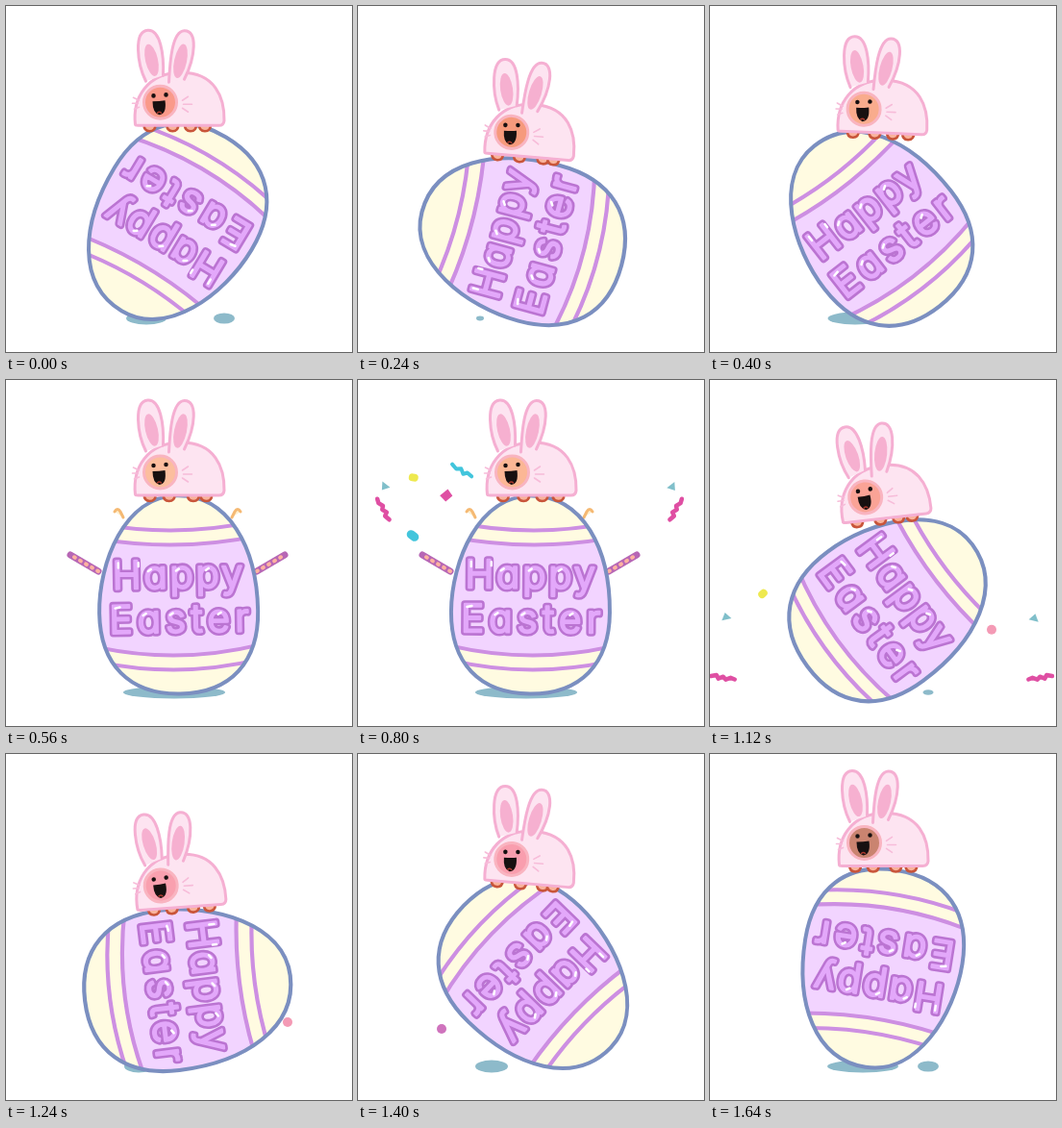
An HTML page for the animation above (1680 ms loop, 360 by 360 pixels).

```html
<!DOCTYPE html>
<html lang="en">
<head>
<meta charset="utf-8">
<title>Happy Easter</title>
<style>
html, body { margin: 0; width: 100%; height: 100%; overflow: hidden; background: #fff; }
svg { display: block; width: 100%; height: 100%; fill: none; stroke-linecap: round; stroke-linejoin: round; }
text { font: 300 40px Inter, sans-serif; font-feature-settings: "cv11"; text-anchor: middle; }
.rim { fill: #bb74d2; stroke: #bb74d2; stroke-width: 7.5; }
.core { fill: #e3a8fa; stroke: #e3a8fa; stroke-width: 2.4; }
.pink { fill: #fde4f1; stroke: #f5afd2; stroke-width: 3; }
</style>
</head>
<body>
<svg viewBox="0 0 360 360">
  <defs>
    <path id="shell" d="M0-103C54-103 82.500-48 82.500 18C82.500 71 53 103 0 103S-82.500 71-82.500 18S-54-103 0-103Z"/>
    <clipPath id="inside"><use href="#shell"/></clipPath>
    <g id="words"><text x="1" y="-7" letter-spacing="3">Happy</text><text x="3" y="39" letter-spacing="5.5">Easter</text></g>
    <g id="popper">
      <path d="M96 199L67 182" stroke="#b767b5" stroke-width="7"/>
      <path d="M96 199L67 182" stroke="#ffb3a0" stroke-width="4" stroke-dasharray="1 6"/>
    </g>
    <path id="paw" d="M113 137q3-5 6 0l3 6" stroke="#f5b973" stroke-width="3" fill="#fff0cf"/>
  </defs>
  <g fill="#8dbaca"><ellipse id="shadow" cy="325"/><ellipse id="spot" cx="227" cy="325"/></g>
  <g id="arms">
    <g id="leftArm"><use href="#popper"/><use href="#paw"/></g>
    <g transform="translate(357) scale(-1 1)"><use href="#leftArm"/></g>
  </g>
  <g id="confetti"></g>
  <g id="egg">
    <use href="#shell" fill="#fffbe1"/>
    <g clip-path="url(#inside)" stroke="#cd8fe2" stroke-width="4">
      <path d="M-90-61Q0-43 90-61V52Q0 74-90 52Z" fill="#f2d4ff"/>
      <path d="M-90-77Q0-57 90-77M-90 67Q0 89 90 67"/>
    </g>
    <use href="#words" class="rim"/>
    <use href="#words" class="core"/>
    <path d="M-62-34v5M-41-34v4M-31-25l3-2M-2-25l3-2M29-25l3-2M-66 13l5-1M-37 21l3-2M-9 21l3-2M41 21l3-2" stroke="#fff" stroke-width="2.400"/>
    <use href="#shell" stroke="#7b8fc0" stroke-width="4"/>
  </g>
  <g id="bunny">
    <g id="feet" fill="#f9b39b" stroke="#c9553a" stroke-width="2.600"></g>
    <path class="pink" d="M-46-2C-49-29-34-56 2-56C37-56 47-30 46.500-6Q46-1 41-1H-43Q-46-1-46-2Z"/>
    <path class="pink" d="M-35-47C-44-65-48-99-33-100C-20-101-16-75-17-53"/>
    <path class="pink" d="M-11-46C-10-66-8-99 5-99.500C19-100 17-73 5-49"/>
    <g fill="#f6b0d0">
      <ellipse cx="-29" cy="-69" rx="6.500" ry="17" transform="rotate(-13 -29 -69)"/>
      <ellipse cx="1" cy="-68" rx="6.500" ry="18" transform="rotate(12 1 -68)"/>
    </g>
    <path d="M3-27l6-4M4-23l9 0M3-19l6 4M-48-30l6 3M-49-24h6M-47-18l5-2" stroke="#f7bcd9" stroke-width="1.600"/>
    <g transform="translate(2 -1)">
      <circle id="face" cx="-22" cy="-24" r="17" stroke="#f9b4c0" stroke-width="3"/>
      <path d="M-29-31v.1M-16-32v.1" stroke="#171010" stroke-width="4.500"/>
      <path d="M-30-25Q-23-25-17-26Q-15-12-23-11Q-30-13-30-25Z" fill="#171010"/>
      <path d="M-25-13q2-2 4 0" stroke="#a8382d" stroke-width="1.500"/>
    </g>
  </g>
</svg>
<script>
const LOOP = 1680, STEP = 40, BURST = 600;
const $ = id => document.getElementById(id);
const set = (el, attrs) => { for (const k in attrs) el.setAttribute(k, attrs[k]); };
const add = (parent, tag, attrs) => {
  const el = document.createElementNS("http://www.w3.org/2000/svg", tag);
  set(el, attrs);
  return parent.appendChild(el);
};
const clamp = v => Math.max(0, Math.min(1, v));

// time, egg angle, bunny tilt, shadow x, shadow radius, spot radius, face r, g, b
const keys = [
  [0, 211, 0, 146, 21, 11, 250, 154, 138],
  [240, 285, 5, 127, 4, 0, 246, 154, 124],
  [560, 359, 0, 175, 53, 0, 252, 190, 158],
  [900, 361, 0, 175, 53, 0, 252, 180, 145],
  [1000, 384, -9, 176, 41, 11, 251, 165, 124],
  [1240, 443, -4, 138, 15, 0, 249, 160, 175],
  [1400, 494, 5, 139, 17, 0, 249, 158, 174],
  [1640, 549, 0, 159, 37, 11, 202, 132, 112],
  [1680, 571, 0, 146, 21, 11, 250, 154, 138]
];
function pose(t) {
  const i = keys.findIndex(k => k[0] > t), a = keys[i - 1], b = keys[i];
  const u = (t - a[0]) / (b[0] - a[0]);
  return a.map((v, j) => v + (b[j] - v) * u);
}

const feet = [-31, -9, 13, 27].map(x => ({ x, el: add($("feet"), "path", { d: "M-6-2Q-6 5 0 5T6-2" }) }));

const ribbon = "M-9 8l3-5 4 1 2-5 4 0 2-5 4-2";
const makePiece = (x, y, attrs, flip = 1) => ({
  x, y, flip, el: add($("confetti"), "path", attrs)
});
const pink = { d: ribbon, stroke: "#df4fa3", "stroke-width": 4.5 };
const chip = { d: "M-4-3L5-4L0 5Z", fill: "#80bfca" };
const pieces = [
  makePiece(13, 208, pink), makePiece(344, 208, pink, -1),
  makePiece(16, 160, chip), makePiece(338, 161, chip, -1),
  makePiece(55, 141, { d: "M0-1v2", stroke: "#eee94f", "stroke-width": 8 }),
  makePiece(122, 127, { d: "M-4 11l3-5-2-4 5-3-1-5 4-5", stroke: "#42c5dc", "stroke-width": 4 }),
  makePiece(101, 179, { d: "M-1-7L7 0L1 6L-6 0Z", fill: "#df4fa3" }),
  makePiece(54, 262, { d: "M1-2l-2 4", stroke: "#42c5dc", "stroke-width": 9 })
];
const dot = color => add($("confetti"), "circle", { r: 5, fill: color });
const leftDot = dot("#cf73bd"), rightDot = dot("#f49ab5");

function draw(t) {
  const [, angle, tilt, shadowX, shadowR, spotR, ...rgb] = pose(t);
  const rad = angle * Math.PI / 180, s = Math.sin(rad), c = Math.cos(rad), lean = Math.abs(s);
  const half = Math.hypot(105 * c, 84 * s) + 2 * Math.abs(Math.sin(2 * rad));
  set($("egg"), {
    transform: `translate(${179.5 + 9.5 * s} ${328.5 - half}) rotate(${angle}) scale(${1 + 0.015 * lean} ${1 + 0.045 * lean})`
  });

  const ride = 119 + 2 * c + 42 * lean ** 2.5;
  set($("bunny"), { transform: `translate(${180.5 - 0.6 * tilt} ${ride}) rotate(${tilt})` });
  set($("face"), { fill: `rgb(${rgb.map(Math.round)})` });
  feet.forEach((f, i) => set(f.el, { transform: `translate(${f.x + 2 * Math.sin(t / 60 + i * 2)} 0)` }));
  set($("shadow"), { cx: shadowX, rx: shadowR, ry: Math.min(6.5, shadowR * 0.6) });
  set($("spot"), { rx: spotR, ry: spotR / 2 });

  const out = clamp((t - 480) / 80) * clamp((920 - t) / 80);
  set($("arms"), { visibility: out ? "visible" : "hidden" });
  set($("leftArm"), { transform: `translate(${30 * (1 - out)} ${18 * (1 - out)})` });

  // Pieces fly up from the popper tips, then fall.
  const u = (t - BURST) / 400;
  for (const p of pieces) {
    const x0 = p.x < 180 ? 66 : 291, fly = 1 - (1 - clamp(u)) ** 2;
    const x = x0 + (p.x - x0) * fly, y = 182 + (p.y - 182) * u - 240 * u * (1 - u);
    set(p.el, {
      visibility: u >= 0 && t < 1200 ? "visible" : "hidden",
      transform: `translate(${x} ${y}) rotate(${(u - 1) * 160 * p.flip}) scale(${p.flip} 1)`
    });
  }
  set(leftDot, { cx: 87, cy: 230 + 0.14 * (t - 1000), visibility: t >= 1000 && t < 1440 ? "visible" : "hidden" });
  set(rightDot, { cx: 293, cy: 279 + 0.16 * (t - 1240), visibility: t >= 1120 && t < 1320 ? "visible" : "hidden" });
}

function tick() {
  draw(Math.floor(performance.now() % LOOP / STEP) * STEP);
  requestAnimationFrame(tick);
}
tick();
</script>
</body>
</html>
```
